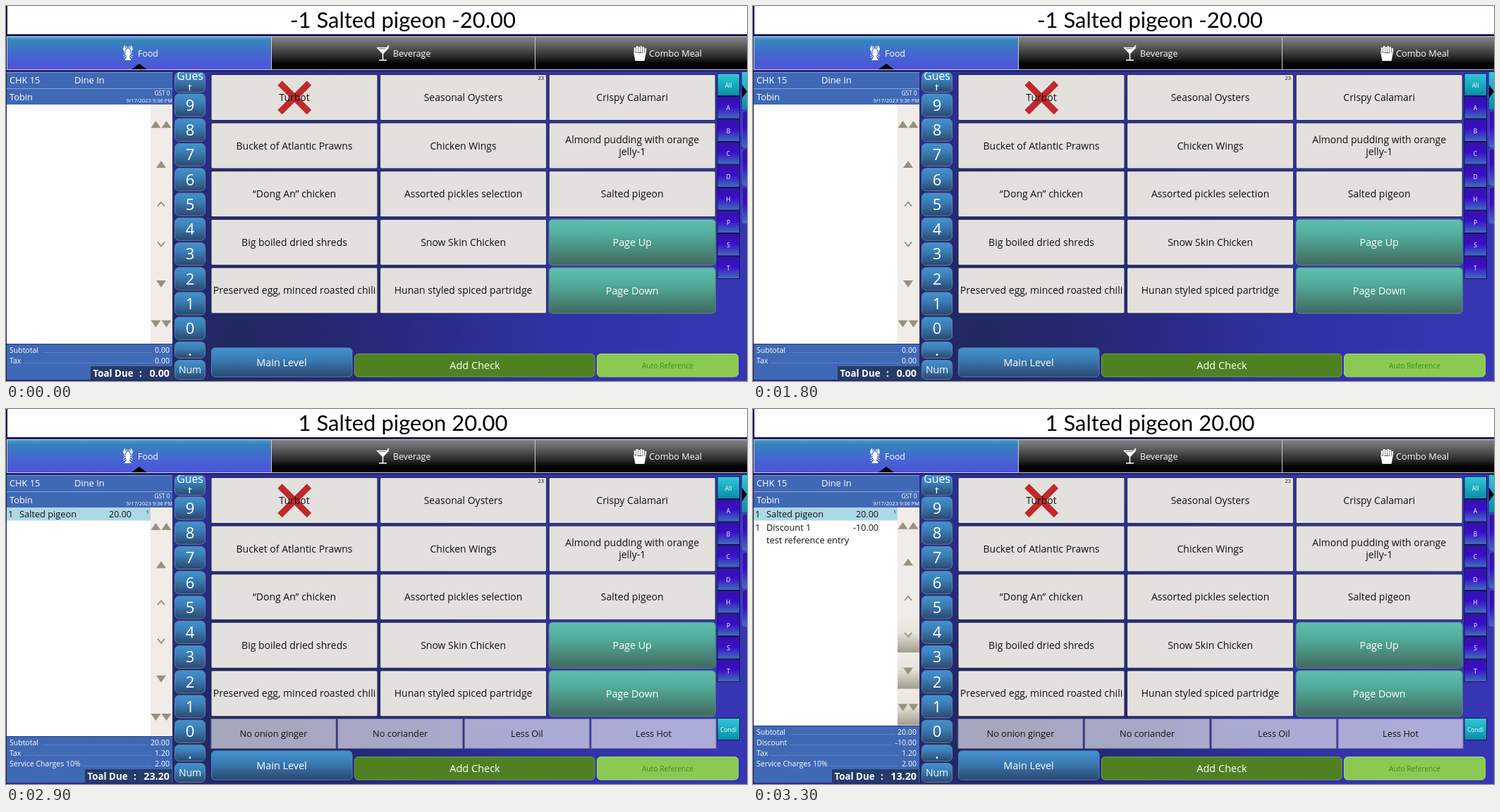
Write an HTML page that moves like this. It is 1051 px wide and 533 px high and loops after 6.3 s.

```html
<!DOCTYPE html>
<html lang="en">
<head>
<meta charset="utf-8">
<title>Point of sale</title>
<style>
html, body { margin: 0; width: 100%; height: 100%; overflow: hidden; background: #242470; }
svg { display: block; width: 100%; height: 100%; }
text { font-family: "Open Sans", "Noto Sans", sans-serif; }
</style>
</head>
<body>
<svg id="stage" viewBox="0 0 1051 533">
  <defs id="defs"></defs>
  <g id="view"></g>
</svg>
<script>
const LOOP = 6300;
const BLUE = '#4069b5', NAVY = '#1b1b58', EDGE = '#20223f';

// Vertical gradients: name -> list of [offset, colour]
const gradients = {
  food: [[0, '#52a3cf'], [.12, '#3585bb'], [.55, '#4467cf'], [1, '#4e52da']],
  dark: [[0, '#858585'], [.25, '#626262'], [.65, '#242424'], [.8, '#050505'], [1, '#000']],
  key: [[0, '#4193d0'], [.4, '#3a7db4'], [1, '#2b4770']],
  page: [[0, '#5fbfae'], [.35, '#52ac9b'], [1, '#41695f']],
  cyan: [[0, '#35c6d6'], [.5, '#17adbf'], [1, '#0b8ca4']],
  letter: [[0, '#3414a8'], [.45, '#3a0cc8'], [1, '#4070bd']],
  scroll: [[0, '#efece6'], [.45, '#e8e4dc'], [1, '#a39c8f']]
};
const stops = list => list.map(([o, c]) => `<stop offset="${o}" stop-color="${c}"/>`).join('');
document.getElementById('defs').innerHTML =
  Object.entries(gradients).map(([id, list]) =>
    `<linearGradient id="${id}" x1="0" y1="0" x2="0" y2="1">${stops(list)}</linearGradient>`).join('') +
  `<radialGradient id="back" gradientUnits="userSpaceOnUse" cx="330" cy="470" r="680">${
    stops([[0, '#20285f'], [.3, '#27297c'], [.65, '#3032a4'], [1, '#3636b2']])}</radialGradient>
  <clipPath id="guest"><rect x="239" y="94" width="44" height="26"/></clipPath>`;

const rect = (x, y, w, h, fill, extra = '') =>
  `<rect x="${x}" y="${y}" width="${w}" height="${h}" fill="${fill}" ${extra}/>`;
const path = (d, fill, extra = '') => `<path d="${d}" fill="${fill}" ${extra}/>`;
const line = (d, stroke, width, extra = '') =>
  path(d, 'none', `stroke="${stroke}" stroke-width="${width}" ${extra}`);
const text = (s, x, y, size, fill = '#fff', anchor = 'start', extra = '') =>
  `<text x="${x}" y="${y}" font-size="${size}" fill="${fill}" text-anchor="${anchor}" ${extra}>${s}</text>`;
const label = (s, x, cy, size, fill) => text(s, x, cy + size * .36, size, fill, 'middle');
const round = (r, stroke) => `rx="${r}" stroke="${stroke}"`;

function tabs() {
  const white = '#fff';
  return rect(0, 40, 1051, 53, NAVY) +
    rect(1.5, 43.5, 375, 47, 'url(#food)', 'stroke="#c4d4ee"') +
    rect(376.5, 43.5, 374, 47, 'url(#dark)', 'stroke="#ccc"') +
    rect(750.5, 43.5, 375, 47, 'url(#dark)', 'stroke="#ccc"') +
    path('M178 90L189 82L200 90Z', '#000') +
    // lobster
    path('M173 61c3 0 4 4 3 8l-1 4 3 4h-10l3-4-1-4c-1-4 0-8 3-8z', white) +
    path('M169 56c-3 2-4 6-1 9l2-4zM177 56c3 2 4 6 1 9l-2-4z', white) +
    line('M172 62l-1-5M174 62l1-5M170 65l-3 2M176 65l3 2M170 68l-4 3M176 68l4 3M170 71l-3 3M176 71l3 3', white, 1) +
    // cocktail
    line('M527 59.5H542L534.5 67.5ZM534.5 67V77M529 77H540M536 65L543 56', white, 1.6) +
    path('M529 61H540L534.5 67Z', white) +
    // fries
    path('M890 65Q899 69 908 65L905.500 78H892.500Z', white) +
    line('M892 65V59M895 66V57M898 66V58M901 66V57M904 66V58M907 65V60', white, 2.4) +
    text('Food', 187, 72, 12.4) + text('Beverage', 549, 72, 12.4) + text('Combo Meal', 912, 72, 12.7);
}

function keypad() {
  const key = (y, h) => rect(239.5, y, 43, h, 'url(#key)', round(6, '#63819f'));
  let s = key(94.5, 28) + `<g clip-path="url(#guest)">${
    text('Gues', 261, 104.5, 15.8, '#fff', 'middle')}${text('t', 261, 122, 15.8, '#fff', 'middle')}</g>`;
  for (let i = 0; i < 10; i++) {
    const cy = 141 + i * 35.25;
    s += key(cy - 16, 32) + label(9 - i, 261, cy, 22);
  }
  return s + key(477.5, 23) + text('.', 261, 497, 22, '#fff', 'middle') +
    key(503.5, 27) + label('Num', 261, 517, 14);
}

function menu(pressed) {
  const dishes = ['Turbot', 'Seasonal Oysters', 'Crispy Calamari',
    'Bucket of Atlantic Prawns', 'Chicken Wings', 'Almond pudding with orange|jelly-1',
    '“Dong An” chicken', 'Assorted pickles selection', 'Salted pigeon',
    'Big boiled dried shreds', 'Snow Skin Chicken', 'Page Up',
    'Preserved egg, minced roasted chili', 'Hunan styled spiced partridge', 'Page Down'];
  return dishes.map((name, i) => {
    const x = 291 + i % 3 * 239.6, y = 97.5 + Math.floor(i / 3) * 68.6, cx = x + 118, cy = y + 32.5;
    if (name.startsWith('Page'))
      return rect(x, y, 236, 65, 'url(#page)', round(5, '#5c8f88')) + label(name, cx, cy, 14.3);
    const lines = name.split('|');
    return rect(x, y, 236, 65, pressed && i == 8 ? '#fbfbfd' : '#e2e1de', round(2, EDGE)) +
      (i ? '' : line('M388.500 109.500L430 151M430 109.500L388.500 151', '#c1292b', 9)) +
      lines.map((s, k) => label(s, cx, cy + (k - (lines.length - 1) / 2) * 17, 14, '#111')).join('');
  }).join('') + text('23', 763, 105, 7.5, '#111', 'end');
}

function index() {
  return ['All', ...'ABCDHPST'].map((s, i) => {
    const y = 96 + i * 32.5;
    return rect(1009, y, 31.5, 31.5, `url(#${i ? 'letter' : 'cyan'})`, 'stroke="#14144e"') +
      label(s, 1024.5, y + 16.5, 8.5);
  }).join('') +
    rect(1044, 94, 8, 53, 'url(#cyan)') + path('M1044 112L1051 121.500L1044 131Z', '#000') +
    [0, 1, 2].map(i => rect(1044, 149 + i * 54, 14, 52, 'url(#letter)', round(4, '#5a56c8'))).join('');
}

function condiments() {
  return ['No onion ginger', 'No coriander', 'Less Oil', 'Less Hot'].map((s, i) => {
    const x = 291 + i * 179.7;
    return rect(x, 440.5, 177, 42, '#f0f0f0', 'fill-opacity=".64" stroke="#70709c"') +
      label(s, x + 88.5, 461.5, 12.8, '#111');
  }).join('') + rect(1009, 439.5, 31.5, 31, 'url(#cyan)', 'stroke="#14144e"') + label('Condi', 1024.5, 455.5, 8.5);
}

function actions(pressed) {
  return rect(291.5, 486, 199.5, 41, 'url(#key)', round(5, '#5b83ab')) + label('Main Level', 391, 507, 14.4) +
    rect(494.5, 494.5, 340.5, 32.5, '#4f8122', round(5, '#78a04c')) + label('Add Check', 665, 511, 14.5) +
    rect(838.5, 494.5, 200, 32.5, pressed ? '#c4e4a6' : '#8bc952', round(5, '#a5d879')) +
    label('Auto Reference', 938.5, 511, 10.2, '#2f9420');
}

// Sums lists [name, amount]; the list above shrinks as rows are added
function check(items, sums, total) {
  const top = 510 - 15 * sums.length, seg = (top - 140) / 6, grey = '#98917f';
  let s = rect(1, 94, 235, 46, BLUE) + rect(1, 94, 235, 1, '#7c97cf') + rect(1, 117, 235, 1, '#8aa4d6') +
    text('CHK 15', 5, 110, 12.8) + text('Dine In', 97, 110, 12.9) + text('Tobin', 5, 133.5, 12.8) +
    text('GST 0', 232.5, 127, 8.3, '#fff', 'end') + text('9/17/2023 9:36 PM', 236, 136.5, 7.5, '#fff', 'end') +
    rect(1, 140, 235, top - 140, '#fefefe') + rect(205, 140, 31, top - 140, '#f1ece8');
  if (items.length > 1)
    for (let i = 3; i < 6; i++) s += rect(205, 140 + i * seg, 31, seg - .7, 'url(#scroll)');
  const tri = (x, y, d) => path(`M${x - 7} ${y + 5 * d}H${x + 7}L${x} ${y - 5 * d}Z`, grey);
  for (let i = 0; i < 6; i++) {
    const y = 140 + (i + .5) * seg, d = i < 3 ? 1 : -1;
    s += i % 5 == 0 ? tri(212.5, y, d) + tri(227.5, y, d)
      : i == 1 || i == 4 ? tri(220, y, d)
      : line(`M215 ${y + 3 * d}L220 ${y - 3 * d}L225 ${y + 3 * d}`, grey, 1.8);
  }
  items.forEach(([count, name, price], i) => {
    const y = 154 + i * 18.5;
    if (!i) s += rect(1, 140, 204, 18.5, '#add8e6') + text(1, 203, 149, 7.5, '#111', 'end');
    s += text(count, 3, y, 12.8, '#111') + text(name, 19, y, 12.8, '#111') + text(price, 178, y, 12.5, '#111', 'end');
  });
  s += rect(1, top, 235, 531 - top, BLUE) + rect(1, top, 235, 1, '#25387c');
  sums.forEach(([name, amount], i) => {
    const y = top + 13 + 15 * i, from = 10 + name.length * 5.3;
    s += line(`M${from} ${y - .5}H${228 - amount.length * 5.3}`, '#91aadb', 1, 'stroke-dasharray="1 2"') +
      text(name, 5, y, 10.5) + text(amount, 232, y, 10.6, '#fff', 'end');
  });
  const left = total.length > 4 ? 112 : 120, bold = 'font-weight="700"';
  return s + rect(left, 512, 123, 19, '#263b67') + text('Toal Due', left + 3.5, 526.5, 13.3, '#fff', 'start', bold) +
    text(':', left + 69, 526.5, 13.3, '#fff', 'start', bold) + text(total, 232, 526.5, 14.3, '#fff', 'end', bold);
}

const empty = {
  title: '-1 Salted pigeon -20.00', items: [], total: '0.00',
  sums: [['Subtotal', '0.00'], ['Tax', '0.00']]
};
const ordered = {
  title: '1 Salted pigeon 20.00', items: [[1, 'Salted pigeon', '20.00']], total: '23.20', condi: true,
  sums: [['Subtotal', '20.00'], ['Tax', '1.20'], ['Service Charges 10%', '2.00']]
};
const discounted = {
  ...ordered, total: '13.20',
  items: [...ordered.items, [1, 'Discount 1', '-10.00'], ['', 'test reference entry', '']],
  sums: [ordered.sums[0], ['Discount', '-10.00'], ...ordered.sums.slice(1)]
};
const timeline = [
  [0, empty], [1700, { ...empty, dish: true }], [1800, empty], [1900, ordered],
  [2800, { ...ordered, auto: true }], [2900, ordered],
  [3100, { ...ordered, veil: true }], [3300, discounted]
];

function render(st) {
  return rect(0, 0, 1051, 533, 'url(#back)') + rect(0, 0, 1051, 40, '#fff') + rect(0, 0, 2, 533, NAVY) +
    text(st.title, 563, 31, 31, '#000', 'middle', 'style="font-family:Lato,sans-serif"') +
    tabs() + check(st.items, st.sums, st.total) + keypad() + menu(st.dish) + index() +
    (st.condi ? condiments() : '') + actions(st.auto) +
    (st.veil ? rect(0, 0, 1051, 533, '#fff', 'opacity=".3"') : '');
}

const view = document.getElementById('view'), start = performance.now();
let shown;
function tick() {
  const t = (performance.now() - start) % LOOP;
  const state = timeline.filter(([at]) => at <= t).pop()[1];
  if (state !== shown) view.innerHTML = render(shown = state);
  requestAnimationFrame(tick);
}
tick();
</script>
</body>
</html>
```
